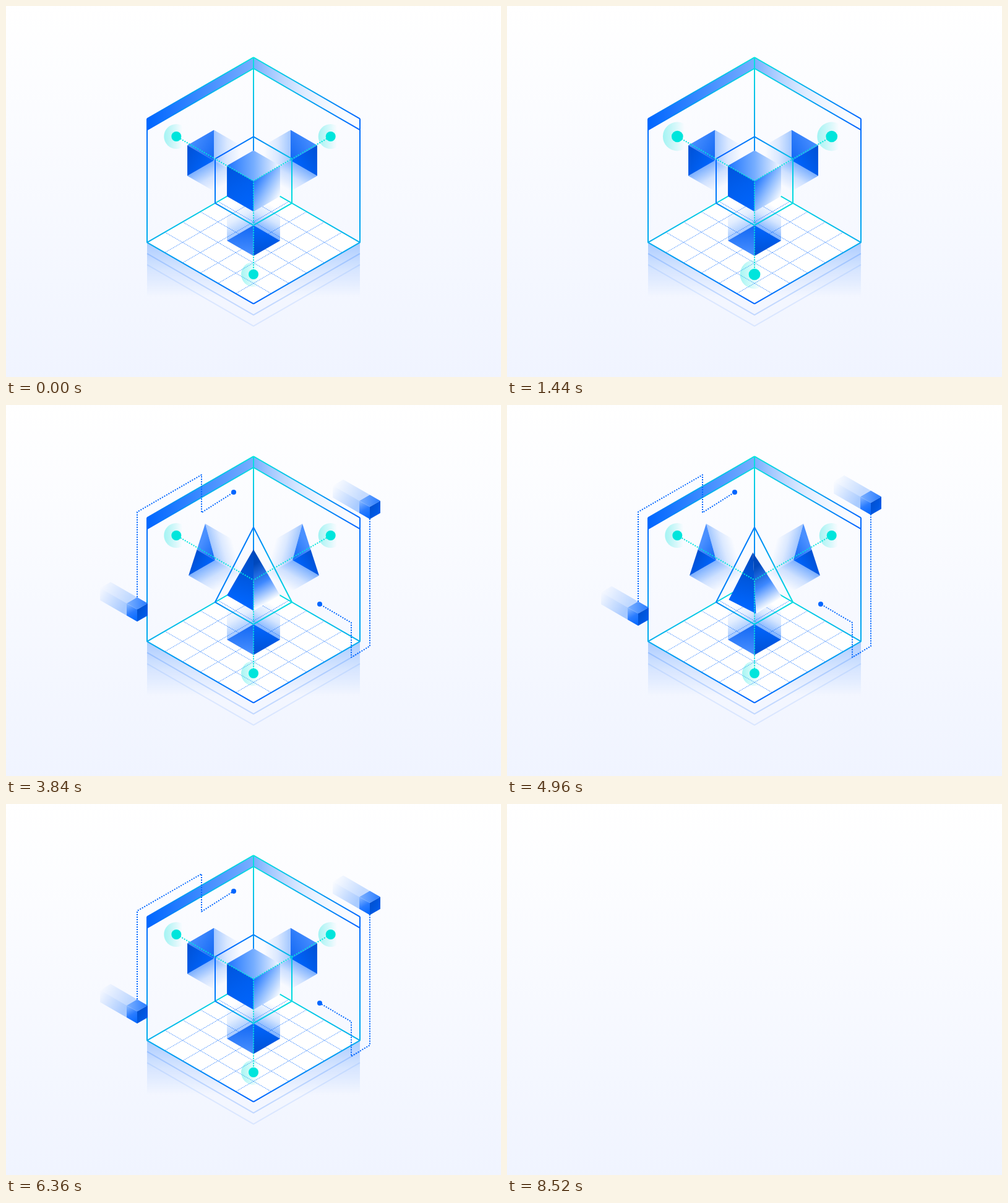
Animation, 800 px wide and 600 px high, one loop 8.68 s. Source, as an HTML page with a canvas:

```html
<!DOCTYPE html>
<html lang="en">
<head>
<meta charset="utf-8">
<title>Isometric shapes</title>
<style>
html, body { margin: 0; width: 100%; height: 100%; overflow: hidden; }
body { background: linear-gradient(#fff, #f0f4ff); }
canvas { display: block; width: 800px; height: 600px; }
</style>
</head>
<body>
<canvas id="stage" width="800" height="600"></canvas>
<script>
const canvas = document.getElementById('stage');
const ctx = canvas.getContext('2d');
const LOOP = 8680;
const ROOM = 198.6, SOLID = 49.6, RIM = 71.6, SMALL = 19.6, BAR = 18;
const CENTER = [400, 283];
const BLUE = '#0066ff', DEEP = '#0048bc', SOFT = '#78aeff', TEAL = '#00e5dc', CYAN = '#00aeee';

const blue = a => `rgba(0,102,255,${a})`;
const span = (t, a, b) => Math.min(1, Math.max(0, (t - a) / (b - a)));
const smooth = u => u * u * (3 - 2 * u);
const back = (u, c) => 1 + (c + 1) * (u - 1) ** 3 + c * (u - 1) ** 2;
const add = (p, q, k = 1) => [p[0] + q[0] * k, p[1] + q[1] * k];
const mid = (p, q) => [(p[0] + q[0]) / 2, (p[1] + q[1]) / 2];

// Isometric axes: a runs down right, b down left, c up
const at = (a, b, c, o = CENTER) => [o[0] + (a - b) * .866, o[1] + (a + b) / 2 - c];
const axis = (a, b, c) => at(a, b, c, [0, 0]);

// Gradient between two points with evenly spaced colours
function fade(p, q, ...colors) {
  const g = ctx.createLinearGradient(...p, ...q);
  colors.forEach((c, i) => g.addColorStop(i / (colors.length - 1), c));
  return g;
}

function poly(points, fill) {
  ctx.beginPath();
  points.forEach(p => ctx.lineTo(...p));
  ctx.closePath();
  ctx.fillStyle = fill;
  ctx.fill();
}

// Stroke the first part of a polyline
function trace(points, part, style, { width = 2, dash = [], offset = 0 } = {}) {
  if (part <= 0) return;
  const sizes = points.slice(1).map((p, i) => Math.hypot(p[0] - points[i][0], p[1] - points[i][1]));
  let left = part * sizes.reduce((a, b) => a + b, 0);
  ctx.beginPath();
  ctx.moveTo(...points[0]);
  sizes.forEach((size, i) => {
    if (left <= 0) return;
    const u = Math.min(1, left / size), p = points[i], q = points[i + 1];
    ctx.lineTo(p[0] + (q[0] - p[0]) * u, p[1] + (q[1] - p[1]) * u);
    left -= size;
  });
  ctx.strokeStyle = style;
  ctx.lineWidth = width;
  ctx.lineJoin = 'round';
  ctx.setLineDash(dash);
  ctx.lineDashOffset = offset;
  ctx.stroke();
}

function disc(x, y, r, fill) {
  ctx.beginPath();
  ctx.arc(x, y, r, 0, 7);
  ctx.fillStyle = fill;
  ctx.fill();
}

function group(alpha, draw, x = 0, y = 0) {
  if (alpha <= 0) return;
  ctx.save();
  ctx.globalAlpha *= alpha;
  ctx.translate(x, y);
  draw();
  ctx.restore();
}

function base(t) {
  const floor = smooth(span(t, 80, 440));
  const drop = back(span(t, 440, 900), 3);
  const rear = at(0, 0, 0), west = at(0, ROOM, 0), east = at(ROOM, 0, 0), front = at(ROOM, ROOM, 0);
  group(span(t, 440, 640), () => {
    const glow = axis(0, 0, -88 * drop);
    poly([west, front, east, add(east, glow), add(west, glow)],
      fade(west, add(west, glow), blue(.3), blue(.12), blue(0)));
    for (const n of [2, 1]) {
      const level = axis(0, 0, -BAR * n * drop);
      trace([west, front, east].map(p => add(p, level)), 1, blue(.2 / n));
    }
  });
  group(floor, () => poly([rear, east, front, west], '#fff'));

  const grid = smooth(span(t, 960, 1360)), dots = { width: 1, dash: [1.2, 1.6] };
  for (let i = 1; i < 6; i++) {
    const k = ROOM * i / 6;
    trace([at(0, k, 0), at(ROOM, k, 0)], grid, BLUE, dots);
    trace([at(k, 0, 0), at(k, ROOM, 0)], grid, BLUE, dots);
  }
  const ink = fade(rear, front, TEAL, CYAN, BLUE);
  for (const side of [west, east]) trace([rear, side, front], floor, ink);
}

function walls(t) {
  const rise = span(t, 320, 860);
  if (!rise) return;
  const h = 200 * back(rise, .9), bar = smooth(span(t, 960, 1280));
  const top = at(0, 0, h), low = at(0, 0, h - BAR);
  const sides = [(c => at(0, ROOM, c)), (c => at(ROOM, 0, c))];
  const fills = [[SOFT, BLUE], [SOFT, 'rgba(200,222,255,.5)', 'rgba(255,255,255,0)']];
  sides.forEach((side, i) => {
    const corner = side(h), under = side(h - BAR), ink = fade(top, corner, TEAL, CYAN, BLUE);
    group(bar, () => poly([top, corner, under, low], fade(top, [corner[0], top[1]], ...fills[i])));
    trace([side(0), corner], 1, fade(corner, side(0), BLUE, CYAN));
    trace([top, corner], 1, ink);
    trace([low, under], bar, ink);
  });
  trace([CENTER, top], 1, fade(top, CENTER, TEAL, CYAN, BLUE));
}

// Flat projection: two triangles, and a haze drawn out from both inner edges
function shadow(o, tip, base, peak, out) {
  [[tip, .35], [base, .5]].forEach(([edge, a]) => {
    const k = (out[0] * edge[0] + out[1] * edge[1]) / (edge[0] ** 2 + edge[1] ** 2);
    const normal = add(out, edge, -k), end = add(o, edge);
    poly([o, end, add(end, out), add(o, out)], fade(o, add(o, normal), blue(a), blue(a / 3), blue(0)));
  });
  const p = add(o, peak);
  poly([o, add(o, tip), p], fade(p, o, '#4a90ff', '#1268f4'));
  poly([o, add(o, base), p], fade(p, o, '#0050d4', BLUE));
}

function wallShadow(pointed) {
  const low = axis(0, SOLID, 0), out = axis(SOLID, 0, 0);
  const tip = pointed ? [-16, -59] : axis(0, 0, SOLID);
  const peak = pointed ? mid(tip, low) : add(tip, low);
  shadow(pointed ? [338, 251] : [336, 250], tip, low, peak, out);
}

function floorShadow() {
  shadow(at(0, 0, -RIM), axis(0, SOLID, 0), axis(SOLID, 0, 0), axis(SOLID, SOLID, 0), axis(0, 0, SOLID));
}

// Cube seen from its front corner
function box(o, s, top, left, right) {
  const p = (a, b, c) => at(a * s, b * s, c * s, o);
  const west = p(-1, 0, 0), east = p(0, -1, 0), low = p(0, 0, -1);
  poly([o, west, p(0, 0, 1), east], fade(west, east, ...top));
  poly([o, west, p(0, 1, 0), low], fade(west, low, ...left));
  poly([o, east, p(1, 0, 0), low], fade(o, p(1, 0, 0), ...right));
}

function cube() {
  box(CENTER, SOLID, ['#1f75ff', '#75adff', '#f4f8ff'], ['#0054dc', '#005ff0', BLUE],
    ['#1a72ff', '#8dbbff', '#fbfdff']);
}

function pyramid() {
  const apex = at(0, 0, SOLID), west = at(0, SOLID, 0), east = at(SOLID, 0, 0), low = at(0, 0, -SOLID);
  poly([apex, west, low], fade(apex, mid(west, low), DEEP, BLUE));
  poly([apex, east, low], fade(mid(apex, CENTER), mid(east, mid(east, low)), DEEP, '#3d88ff', '#fbfdff'));
}

// Small cube with a trail to the upper left
function courier(x, y) {
  const o = [x, y], west = at(-SMALL, 0, 0, o), tail = axis(-SOLID, 0, 0);
  [at(0, 0, SMALL, o), at(0, SMALL, 0, o)].forEach((corner, i) => {
    poly([west, corner, add(corner, tail), add(west, tail)],
      fade(west, add(west, tail), blue(.22 + .1 * i), blue(0)));
  });
  box(o, SMALL, ['#7db1ff', '#2a7cff'], ['#8fbcff', '#2a7cff', BLUE], ['#0050d0', '#005cec']);
}

function frame(now) {
  const loop = now % LOOP;
  const poster = loop < 80;
  const t = poster ? 1480 : loop;
  const dotted = { dash: [2, 2], offset: -t / 100 };

  canvas.style.opacity = 1 - span(loop, 7960, 8520);
  ctx.clearRect(0, 0, 800, 600);
  base(t);
  walls(t);

  // Projections, outline and the floating solid
  const pointed = t >= 3760 && t < 6280;
  const enter = smooth(span(t, 1040, 1360)), slide = 1 - enter;
  group(enter, () => wallShadow(pointed), 25 * slide, 14 * slide);
  group(enter, () => {
    ctx.translate(pointed ? 801 : 796, 0);
    ctx.scale(-1, 1);
    wallShadow(pointed);
  }, -25 * slide, 14 * slide);
  group(enter, floorShadow, 0, -24 * slide);

  const west = at(0, RIM, 0), east = at(RIM, 0, 0), low = at(0, 0, -RIM);
  const apex = at(0, 0, RIM * (pointed ? 1.19 : 1));
  const upper = pointed ? [] : [at(-RIM, 0, 0)], lower = pointed ? [] : [at(0, -RIM, 0)];
  trace([apex, ...upper, west, low, east, ...lower, apex], smooth(span(t, 960, 1360)),
    fade(at(-RIM, 0, -RIM / 4), at(RIM, 0, -RIM / 4), BLUE, CYAN, TEAL));

  const [from, to, depth] = t < 3760 ? [1520, 3760, .8] : pointed ? [3760, 6280, 1] : [6280, 8800, .8];
  const sway = depth * (1 - Math.cos(2 * Math.PI * span(t, from, to))) / 2;
  group(enter, () => {
    ctx.translate(CENTER[0], CENTER[1] + 5 * sway - 20 * slide);
    ctx.rotate(-.054 * sway);
    ctx.translate(-CENTER[0], -CENTER[1]);
    (pointed ? pyramid : cube)();
  });

  // Beams to the three markers
  const beam = smooth(span(t, 1080, 1360));
  const settle = smooth(span(t, 1440, 1840));
  const size = poster ? 1 : smooth(span(t, 1200, 1440)) * (1.17 - .17 * settle);
  for (const [x, y] of [at(-144, 0, 0), at(0, -144, 0), at(0, 0, -151)]) {
    trace([CENTER, [x, y]], beam, TEAL, dotted);
    const r = 20 * size;
    disc(x, y, r, fade([x - r, y], [x + r / 2, y], 'rgba(0,229,220,.35)', 'rgba(0,229,220,0)'));
    disc(x, y, 8 * size, TEAL);
  }

  // Side routes with the two small cubes
  const route = smooth(span(t, 1480, 2000));
  const arrive = span(t, 1840, 2360);
  const shift = axis(46 * (back(arrive, 1.7) - 1), 0, 0);
  const bob = 5 * Math.cos((165 + .113 * (t - 3840)) * Math.PI / 180);
  const routes = [
    [[368, 141], [316, 174], [316, 113], [212, 173], [212, 335.5 + bob]],
    [[507, 322], [558, 352], [558, 408], [588, 390], [588, 160 - bob]]
  ];
  for (const path of routes) {
    trace(path, route, BLUE, dotted);
    disc(...path[0], 4 * span(t, 1480, 1600), BLUE);
    group(span(arrive, 0, .5), () => courier(...add(path[4], shift)));
  }
}

const start = performance.now();
function tick() {
  frame(performance.now() - start);
  requestAnimationFrame(tick);
}
tick();
</script>
</body>
</html>
```
